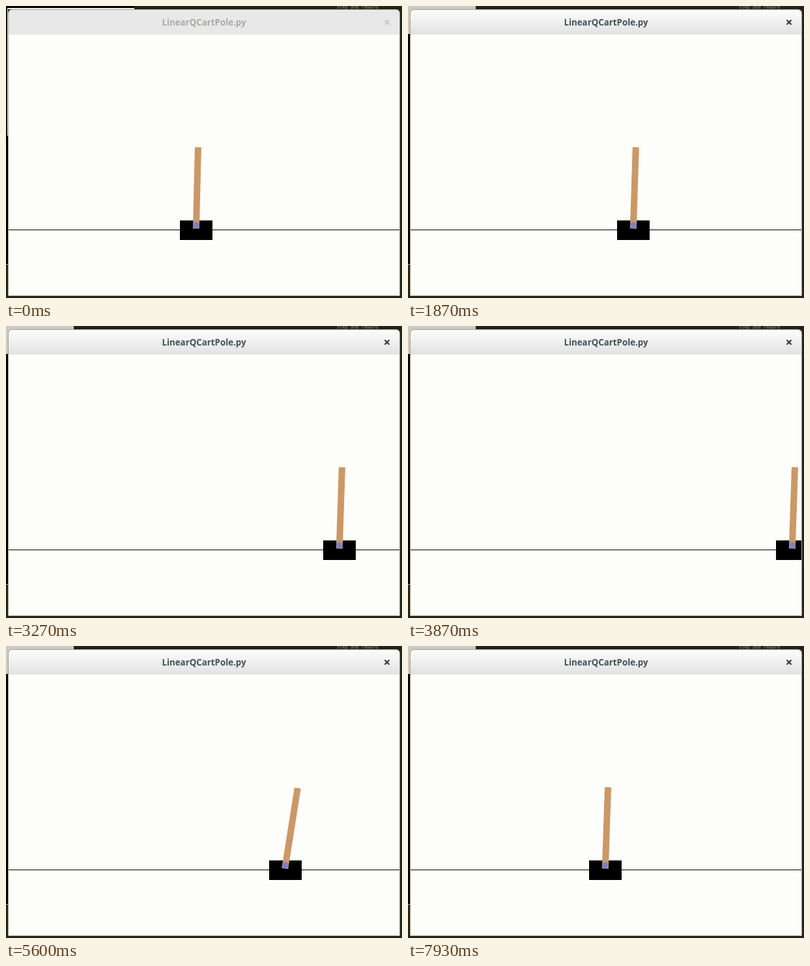
An HTML page with a canvas that plays this animation: 608x448 px, repeating every 8000 ms.

```html
<!DOCTYPE html>
<html lang="en">
<head>
<meta charset="utf-8">
<title>Cart pole</title>
<style>
  html, body { margin: 0; width: 100%; height: 100%; overflow: hidden; background: #24241a; }
  canvas { display: block; }
</style>
</head>
<body>
<canvas id="stage" width="608" height="448"></canvas>
<script>
const ctx = document.getElementById('stage').getContext('2d');
const LOOP = 8000, STEP = 200 / 3, FOCUS_AT = 400;

// Rises from 0 and settles into a straight line that starts at zero seconds.
const ramp = (s, softness) => softness * Math.log(1 + Math.exp(s / softness));

// Cart centre in px and pole angle in degrees, s seconds into an episode.
const episodes = [
  {
    start: 0,
    x: s => 291 + 130 * ramp(s - 1.57, 0.35),
    angle: s => 1.9 - 0.5 * Math.exp(-s)
  },
  {
    start: 3.98,
    x: s => 308 + 9.9 * s + 22.4 * s ** 3.2,
    angle: s => 9 * Math.sin(0.94 * s) ** 2
  },
  {
    start: 6.17,
    x: s => 303.6 - 7 * Math.sin(2.45 * Math.max(0, s - 0.6)) ** 2,
    angle: s => 1.5 * (s - 0.63) ** 2
  }
];

function rect(x, y, w, h, color) {
  ctx.fillStyle = color;
  ctx.fillRect(x, y, w, h);
}

function drawDesktop(focused) {
  rect(0, 0, 608, 448, '#24241a');
  rect(0, 0, 4, 396, '#000');
  rect(0, 396, 3, 1, '#a8a8a0');
  if (focused) {
    rect(0, 0, 104, 8, '#c9c9c6');
    rect(0, 0, 4, 43, '#c9c9c6');
  } else {
    rect(0, 0, 197, 3, '#000');
    rect(2, 3, 195, 2, '#f0efe4');
    rect(2, 5, 1, 194, '#f0efe4');
  }
  ctx.font = '7px "DejaVu Sans Mono", monospace';
  ctx.textAlign = 'left';
  ctx.fillStyle = '#94948a';
  ctx.fillText('step and reward', 508, 4);
}

function drawWindow(focused) {
  ctx.save();
  ctx.beginPath();
  ctx.roundRect(3, 5, 602, 440, [6, 6, 0, 0]);
  ctx.fillStyle = '#a9a980';
  ctx.fill();
  ctx.beginPath();
  ctx.roundRect(4, 6, 600, 438, [5, 5, 0, 0]);
  ctx.clip();
  rect(4, 44, 600, 400, '#fdfefb');
  let bar = '#e8e8e9';
  if (focused) {
    bar = ctx.createLinearGradient(0, 6, 0, 44);
    bar.addColorStop(0, '#fcfcfb');
    bar.addColorStop(1, '#e2e2e2');
  }
  rect(4, 6, 600, 38, bar);
  ctx.restore();

  ctx.font = 'bold 13.3px "Open Sans", "Noto Sans", sans-serif';
  ctx.textAlign = 'center';
  ctx.fillStyle = focused ? '#40525a' : '#a9aaa2';
  ctx.fillText('LinearQCartPole.py', 304, 30);
  ctx.strokeStyle = focused ? '#2e3a40' : '#c6c7c4';
  ctx.lineWidth = 2.2;
  ctx.beginPath();
  ctx.moveTo(581.5, 21.5);
  ctx.lineTo(588.5, 28.5);
  ctx.moveTo(588.5, 21.5);
  ctx.lineTo(581.5, 28.5);
  ctx.stroke();
}

function drawCart(x, angle) {
  ctx.save();
  ctx.beginPath();
  ctx.rect(4, 44, 600, 400);
  ctx.clip();
  rect(4, 343, 600, 1, '#000');
  rect(x - 25, 329, 50, 30, '#000');
  ctx.translate(x, 336.5);
  ctx.rotate(angle * Math.PI / 180);
  rect(-5, -120, 10, 125, '#cc9864');
  ctx.beginPath();
  ctx.arc(0, 0, 5, 0, Math.PI * 2);
  ctx.fillStyle = '#8080c8';
  ctx.fill();
  ctx.restore();
}

function draw(now) {
  // The simulation is shown at fifteen pictures a second.
  const t = Math.floor((now % LOOP + 4) / STEP) * STEP % LOOP;
  const episode = episodes.findLast(e => t / 1000 >= e.start);
  const s = t / 1000 - episode.start;
  const focused = t >= FOCUS_AT;
  drawDesktop(focused);
  drawWindow(focused);
  drawCart(Math.round(episode.x(s)), episode.angle(s));
}

const start = performance.now();
function tick() {
  draw(performance.now() - start);
  requestAnimationFrame(tick);
}
tick();
</script>
</body>
</html>
```
